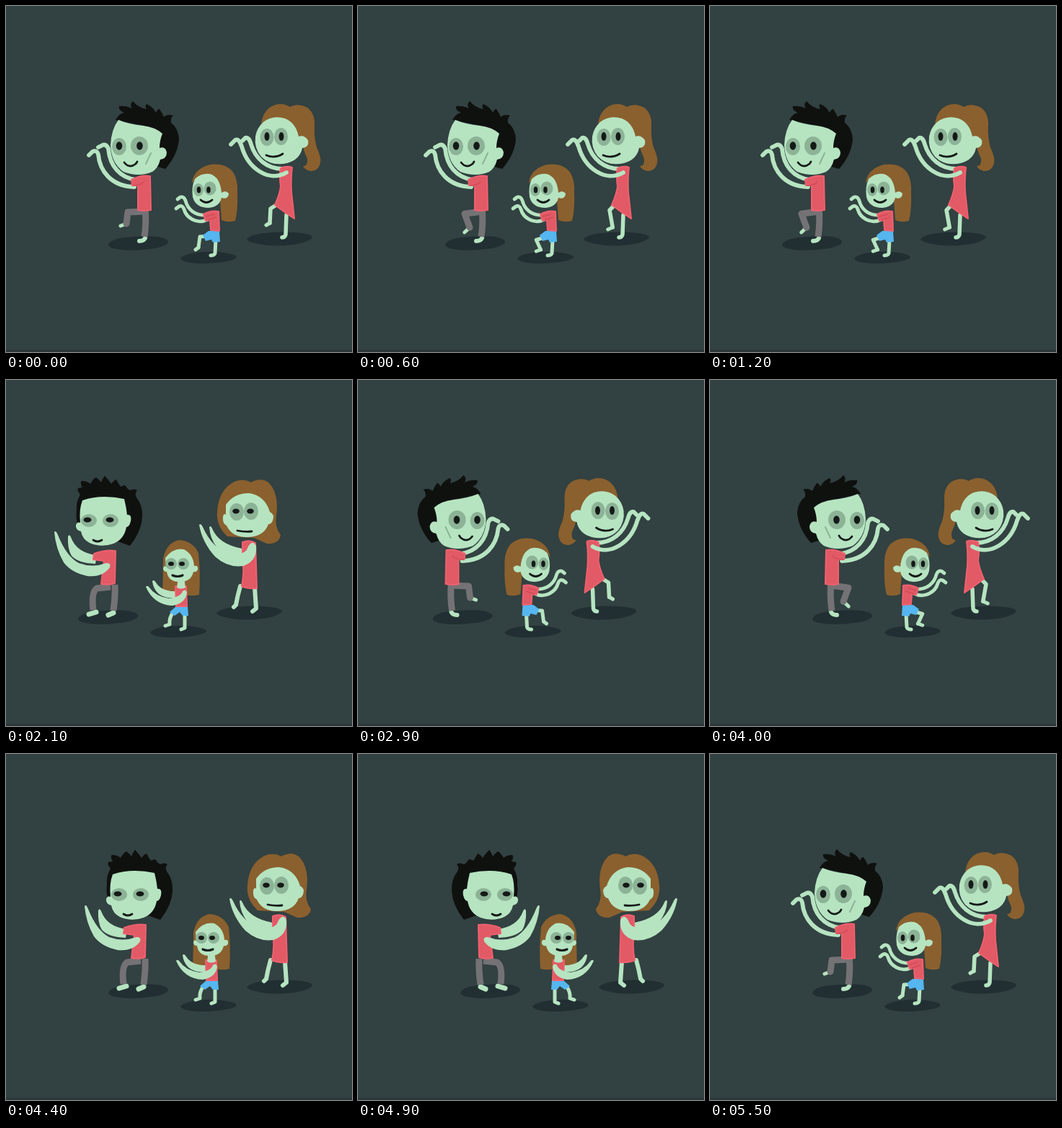
Animation, 480 px wide and 480 px high, one loop 5600 ms. Source, as an HTML page with a canvas:

```html
<!DOCTYPE html>
<html>
<head>
<meta charset="utf-8">
<title>Zombie family dance</title>
<style>
html, body { margin: 0; width: 100%; height: 100%; overflow: hidden; background: #324141; }
canvas { display: block; width: 480px; height: 480px; }
</style>
</head>
<body>
<canvas id="stage" width="480" height="480"></canvas>
<script>
const ctx = document.getElementById('stage').getContext('2d');
const SKIN = '#b6e4c1', BAG = '#8db397', RED = '#e15a65', EDGE = '#f0606f', FOLD = '#d04c59',
  BLACK = '#0f110f', INK = '#141a18', BROWN = '#8a602e', GREY = '#747275', BLUE = '#55b6f0',
  SHADE = '#212f32';

function fill(color, d) {
  ctx.fillStyle = color;
  ctx.fill(new Path2D(d));
}
function line(color, width, d, cap = 'round') {
  ctx.strokeStyle = color;
  ctx.lineWidth = width;
  ctx.lineCap = cap;
  ctx.lineJoin = 'round';
  ctx.stroke(new Path2D(d));
}
function oval(color, x, y, rx, ry) {
  ctx.fillStyle = color;
  ctx.beginPath();
  ctx.ellipse(x, y, rx, ry, 0, 0, 7);
  ctx.fill();
}
function cloth(color, edge, d) {
  fill(color, d);
  line(edge, 2, d);
}
// bags: x, y, rx, ry per eye; eyes: x per eye, shared y and radii
function eyes(bags, xs, y, rx, ry) {
  bags.forEach(b => oval(BAG, ...b));
  xs.forEach(x => oval(INK, x, y, rx, ry));
}
// Front leg between lowered (lift 0) and raised (lift 1); points are knee, ankle, toe
function leg(lift, hip, up, down, width, color) {
  const p = up.map((v, i) => down[i] + (v - down[i]) * lift);
  line(SKIN, 5, `M${p[2]} ${p[3]}L${p[4]} ${p[5]}`);
  line(color, width, `M${hip}L${p[0]} ${p[1]}L${p[2]} ${p[3]}`);
}
function arm(turn, x, y, d) {
  ctx.save();
  ctx.translate(x, y);
  ctx.rotate(turn);
  ctx.translate(-x, -y);
  fill(SKIN, d);
  ctx.restore();
}

// Every figure faces left and is mirrored about cx to face right
const dad = {
  cx: 180.5,
  shadow: 'M142 331Q146 323 166 321Q190 318 211 320Q226 323 225 328Q220 335 200 337Q172 341 152 337Q142 335 142 331Z',
  side(lift) {
    line(SKIN, 5.8, 'M180 241C158 238 144 222 142 198Q139 191 134 193L128 196');
    line(SKIN, 5.8, 'M178 251C145 250 130 228 128 206Q126 199 120 202L115 207');
    line(SKIN, 6, 'M193 322Q191 326 185 326');
    line(GREY, 9, 'M193 280Q195 300 192 320', 'butt');
    leg(lift, '193 285', [169, 286, 167, 302, 159, 305], [169, 289, 179, 309, 172, 317], 9, GREY);
    cloth(RED, EDGE, 'M174 241Q187 234 200 236L201 283Q190 285 183 283L183 249L175 249Z');
    line(FOLD, 1.5, 'M176 249Q187 249 191 244');
    fill(BLACK, 'M152 158Q157 149 164 148Q155 144 157 139Q166 138 175 142Q171 137 176 132Q183 141 195 143Q192 139 195 136Q203 139 208 148Q210 143 213 143Q217 149 219 154Q224 149 232 152Q228 155 229 162Q239 169 240 185Q238 207 221 226L207 222Q200 180 190 166Z');
    fill(SKIN, 'M156 158Q146 171 145 193Q146 218 163 230Q184 238 203 230Q211 225 214 213Q223 212 223 203Q221 194 213 197Q213 187 217 177Q207 168 190 166Q170 164 156 158Z');
    eyes([[157, 195, 10, 12], [185, 194, 12, 13]], [157, 185.5], 194, 4.3, 5.8);
    line(INK, 2.8, 'M164 217Q171 226 180 219L182 216');
    line(BAG, 2, 'M201 204L194 219');
  },
  front(turn) {
    arm(turn, 165, 248, 'M128 217Q130 213 132 218Q140 240 168 243L166 255Q142 254 133 244Q127 234 128 217Z');
    line(SKIN, 7, 'M167 322L157 325M191 323L184 326');
    line(GREY, 9, 'M193 284Q194 297 191 320M187 287L168 289Q160 294 163 319', 'butt');
    cloth(RED, EDGE, 'M164 241Q180 235 194 237L193 282Q184 285 174 283L178 251L163 249Z');
    arm(turn, 184, 255, 'M109 211Q111 208 114 215Q126 245 143 254Q162 261 181 254Q188 253 186 260Q176 274 155 272Q132 267 122 253Q111 234 109 211Z');
    fill(BLACK, 'M144 209Q138 195 140 181Q139 169 145 159Q140 153 142 150L148 149Q144 142 147 140Q154 140 159 144Q163 137 167 135Q172 139 174 142Q177 135 179 133Q184 138 188 144Q192 139 195 138Q198 144 201 148Q206 145 208 147Q210 151 214 153Q220 150 224 153Q220 157 223 163Q232 174 231 190Q230 210 214 230L200 225Z');
    fill(SKIN, 'M148 167Q174 158 206 165Q209 177 210 187Q217 186 215 196Q213 204 209 204Q206 221 191 227Q174 233 158 226Q148 221 146 210Q138 208 139 201Q141 196 145 198Q143 180 148 167Z');
    eyes([[157, 195, 11, 9], [187, 195, 11, 9]], [155, 186], 194, 5.5, 3.5);
    line(INK, 2.8, 'M163 222Q169 226 175 222');
  }
};

const girl = {
  cx: 281.5,
  shadow: 'M242 350Q247 344 265 342Q288 339 308 343Q320 345 320 349Q315 354 294 356Q266 359 250 355Q243 353 242 350Z',
  side(lift) {
    line(SKIN, 4.8, 'M277 290C262 291 252 282 249 270Q247 264 242 265L238 268');
    line(SKIN, 4.8, 'M280 296C264 304 250 293 247 282Q245 276 240 278L236 281');
    line(SKIN, 5, 'M291 324L290 343Q289 346 284 346');
    leg(lift, '286 319', [269, 320, 267, 335, 263, 338], [268, 326, 277, 339, 270, 341], 5, SKIN);
    fill(BLUE, 'M281 312L296 312L297 327L287 328L285 324L277 326L273 318Z');
    cloth(RED, EDGE, 'M274 289Q284 283 295 285L296 312L284 311L283 297L277 298Z');
    line(FOLD, 1.5, 'M277 292L288 289M280 297L291 293');
    fill(BROWN, 'M258 246Q260 226 283 220Q306 217 316 232Q322 243 321 258Q322 282 318 298Q308 301 299 297L297 270Q294 240 275 233Q266 235 258 246Z');
    fill(SKIN, 'M262 240Q271 231 283 233Q297 237 299 259Q305 255 309 260Q309 266 303 267L299 266Q296 279 281 280Q263 280 259 265Q257 251 262 240Z');
    eyes([[267, 255, 7, 9], [283, 253, 8.5, 9.5]], [267.5, 281], 255, 2.8, 4.5);
    line(INK, 2.8, 'M270 269Q278 276 286 269');
  },
  front(turn) {
    fill(BROWN, 'M259 298Q260 265 260 248Q264 226 282 222Q301 223 309 240Q312 270 310 298Q297 301 290 297L274 297Q266 301 259 298Z');
    arm(turn, 275, 298, 'M245 279Q247 276 250 281Q258 294 279 293L277 302Q263 304 253 296Q246 289 245 279Z');
    line(SKIN, 5, 'M274 322Q268 330 269 339L263 341M290 325L290 344L285 346');
    fill(BLUE, 'M278 314L294 314L295 327L287 327L283 322L276 327L269 322Z');
    cloth(RED, EDGE, 'M277 286L292 286L293 314L278 314Z');
    arm(turn, 289, 294, 'M236 287Q238 284 241 288Q249 300 268 303Q284 301 287 293Q291 289 293 295Q291 310 273 313Q247 312 236 287Z');
    fill(SKIN, 'M281 274L289 274L291 288Q285 291 279 288Z');
    fill(SKIN, 'M263 247Q274 232 289 235Q302 242 303 258Q309 257 308 263Q306 267 302 266Q299 280 283 280Q267 280 265 266Q260 266 260 261Q261 257 264 259Z');
    eyes([[271, 255, 8, 8], [288, 255, 8, 8]], [271, 286], 255, 4, 3);
    line(INK, 3.2, 'M273 271Q280 274 287 271');
  }
};

const mom = {
  cx: 376.5,
  shadow: 'M334 323Q340 317 358 315Q385 312 411 315Q425 317 425 321Q419 328 399 331Q366 335 346 329Q335 327 334 323Z',
  side(lift) {
    line(SKIN, 5.8, 'M384 226C362 226 346 212 340 192Q337 181 332 183L328 187');
    line(SKIN, 5.5, 'M389 290L388 317Q387 321 383 321');
    leg(lift, '380 273', [367, 281, 366, 301, 361, 304], [371, 284, 377, 309, 370, 312], 5.5, SKIN);
    cloth(RED, EDGE, 'M381 225Q390 221 397 224Q395 240 396 258L400 295Q386 286 373 276Q380 260 381 250Q379 236 381 225Z');
    line(SKIN, 5.8, 'M389 231C365 245 336 226 327 195Q323 183 318 186L312 192');
    fill(BROWN, 'M354 163Q357 144 371 138Q383 133 394 140Q404 134 418 141Q429 149 428 167Q427 181 431 196Q438 211 436 218Q433 230 422 229Q414 227 412 222Q419 222 418 212Q414 203 412 196L405 180Z');
    fill(SKIN, 'M357 161Q370 151 387 156Q402 162 406 181Q413 178 419 186Q421 196 411 197Q408 213 390 218Q368 223 354 209Q344 197 346 181Q348 169 357 161Z');
    eyes([[362, 182, 9.5, 12], [381.5, 181, 9.5, 12]], [362, 382], 181, 3.5, 6);
    line(INK, 2.8, 'M361 207Q373 212 384 205');
  },
  front(turn) {
    arm(turn, 370, 240, 'M324 204Q326 201 328 206Q337 228 370 234L368 246Q344 243 335 233Q325 220 324 204Z');
    line(SKIN, 6, 'M367 286Q363 300 361 312L358 315M387 288L389 317L384 321');
    cloth(RED, EDGE, 'M370 225Q380 221 388 226L390 289Q378 290 369 286Q373 266 370 246Z');
    arm(turn, 384, 234, 'M310 201Q312 198 315 204Q328 233 350 240Q374 245 378 231Q384 221 389 230Q391 251 371 258Q350 261 332 245Q314 225 310 201Z');
    fill(BROWN, 'M349 217Q333 202 335 182Q337 152 359 141Q371 136 382 142Q397 134 407 143Q421 158 417 188Q414 203 423 215Q421 228 404 227L386 219Z');
    fill(SKIN, 'M347 173Q358 157 379 157Q401 160 408 183Q415 186 412 195Q410 200 406 200Q400 217 378 218Q356 219 348 202Q342 199 343 190Q344 184 347 187Z');
    eyes([[362, 183, 10, 12], [382, 182, 10, 12]], [361, 381], 182, 4.8, 3.4);
    line(INK, 2.8, 'M363 209Q373 211 383 210');
  }
};

const SWING = [0, -0.1, -0.9, 0];

function poseAt(t) {
  const back = t >= 2800, u = t % 2800, start = back ? 1 : -1;
  const walked = 42 * Math.min(u / 1200, 1);
  const pose = { dx: back ? walked - 42 : -walked, dir: start, front: false, lift: 1 };
  if (u <= 1200) {
    if (u > 200) pose.lift = 0.5 + 0.5 * Math.cos((u - 200) * Math.PI / 300);
    return pose;
  }
  // Three half-turns, each a crouch, a low swing, a reach and a settled pose
  const n = u < 1900 ? 0 : u < 2400 ? 1 : 2;
  const step = Math.round((u - [1300, 1800, 2300][n]) / 100);
  pose.dir = start * (n % 2 ? -1 : 1) * (step > 1 ? -1 : 1);
  pose.front = step > 0 && step < 4;
  pose.lift = step < 1 ? 0 : 1;
  pose.turn = SWING[step];
  return pose;
}

function draw(now) {
  const t = Math.floor(now % 5600 / 100) * 100;
  const pose = poseAt(t);
  ctx.fillStyle = '#324141';
  ctx.fillRect(0, 0, 480, 480);
  ctx.fillStyle = '#2b3739';
  ctx.fillRect(0, 477, 480, 3);
  for (const who of [mom, dad, girl]) {
    ctx.save();
    ctx.translate(pose.dx, 0);
    fill(SHADE, who.shadow);
    ctx.translate(who.cx, 0);
    ctx.scale(-pose.dir, 1);
    ctx.translate(-who.cx, 0);
    if (pose.front) who.front(pose.turn);
    else who.side(pose.lift);
    ctx.restore();
  }
}

const begin = performance.now();
function tick() {
  draw(performance.now() - begin);
  requestAnimationFrame(tick);
}
tick();
</script>
</body>
</html>
```
